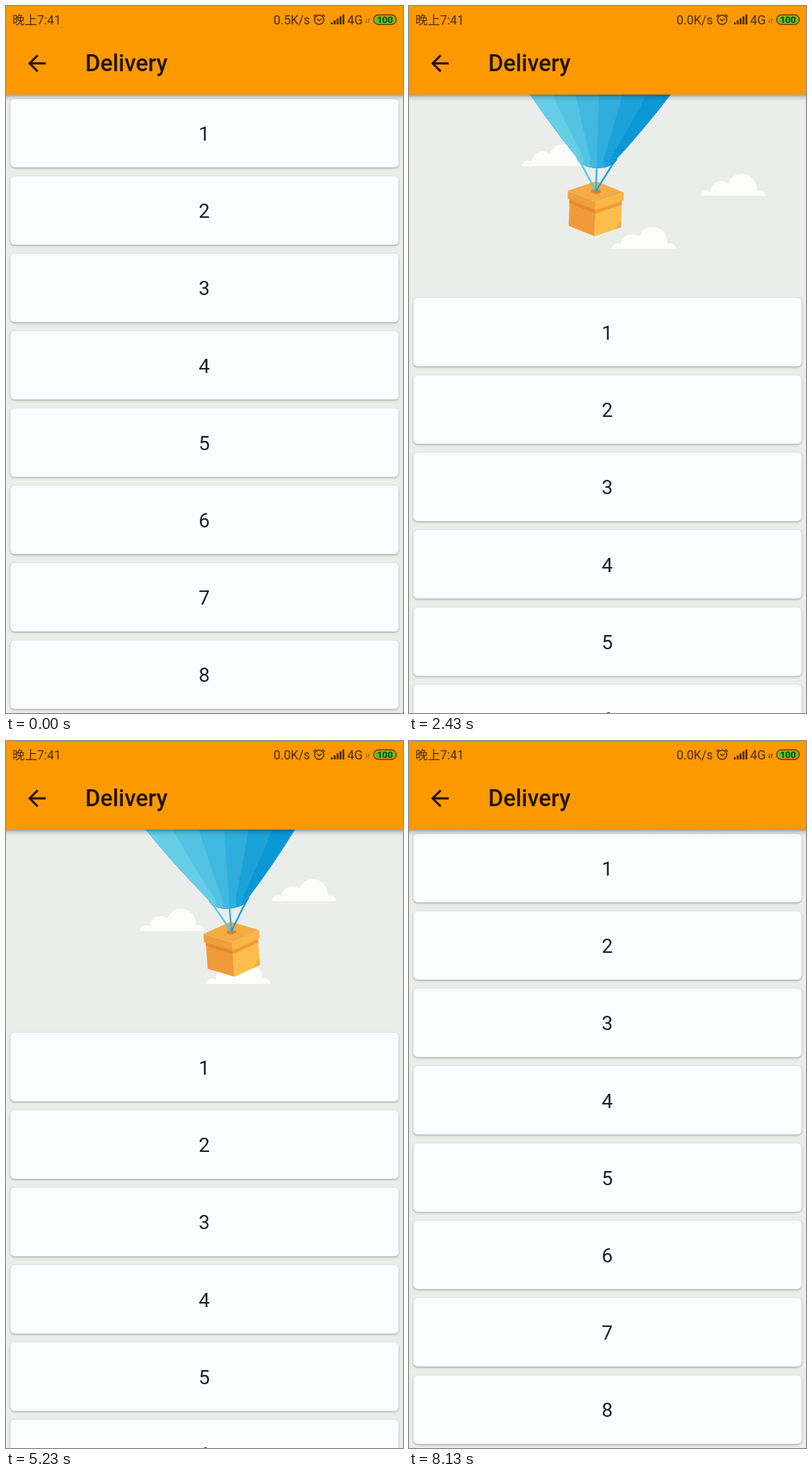
Recreate the animation shown at these times as an HTML page with a canvas. Size 561x998 px, loop 8160 ms.

```html
<!DOCTYPE html>
<html lang="en">
<head>
<meta charset="utf-8">
<title>Delivery</title>
<style>
html, body { margin: 0; width: 100%; height: 100%; overflow: hidden; background: #ebedeb; }
canvas { display: block; width: 561px; height: 998px; }
</style>
</head>
<body>
<canvas id="stage" width="561" height="998"></canvas>
<script>
const W = 561, H = 998, LOOP = 8160;
const BAR = 125, REST = 281, PEAK = 321;
const REFRESH = 1610, CLOUD_W = 93, CLOUD_H = 31;
const ORANGE = '#fd9900', INK = '#211400', STATUS = 'rgba(0,0,0,0.7)';
const ctx = document.getElementById('stage').getContext('2d');

const clamp01 = x => Math.max(0, Math.min(1, x));
const ease = (t, from, to) => (1 - Math.cos(Math.PI * clamp01((t - from) / (to - from)))) / 2;

function poly(color, ...pts) {
  ctx.fillStyle = color;
  ctx.beginPath();
  for (const [x, y] of pts) ctx.lineTo(x, y);
  ctx.fill();
}

function line(color, width, ...pts) {
  ctx.strokeStyle = color;
  ctx.lineWidth = width;
  ctx.beginPath();
  for (const [x, y] of pts) ctx.lineTo(x, y);
  ctx.stroke();
}

function disc(x, y, r) {
  ctx.beginPath();
  ctx.arc(x, y, r, 0, 2 * Math.PI);
  ctx.fill();
}

function pill(color, x, y, w, h, r) {
  ctx.fillStyle = color;
  ctx.beginPath();
  ctx.roundRect(x, y, w, h, r);
  ctx.fill();
}

function text(str, x, y, font, color, align = 'left') {
  ctx.font = font;
  ctx.fillStyle = color;
  ctx.textAlign = align;
  ctx.fillText(str, x, y);
}

function clipRect(x, y, w, h) {
  ctx.beginPath();
  ctx.rect(x, y, w, h);
  ctx.clip();
}

// Pull down, settle at the refreshing height, then close.
function pullExtent(t) {
  return PEAK * ease(t, 530, 1400)
    - (PEAK - REST) * ease(t, 1460, 1740)
    - REST * ease(t, 5640, 6330);
}

// Time since the refresh began; the first stretch runs slightly slow.
function refreshTime(t) {
  return t < 4030 ? (t - REFRESH) * 0.975 : 2360 + t - 4030;
}

function drawCloud(x, bottom) {
  ctx.save();
  ctx.translate(x, bottom - CLOUD_H);
  clipRect(0, 0, CLOUD_W, CLOUD_H);
  ctx.fillStyle = '#fcfdfb';
  for (const [cx, height] of [[9, 8], [30, 21], [59, 31], [84, 8]]) {
    const r = 4 + height * 0.55;
    disc(cx, CLOUD_H - height + r, r);
  }
  ctx.fillRect(16, 26, 64, 5);
  ctx.restore();
}

// One upright isometric face, from the front edge out to one side.
const SLOPE = 0.37;
function wall(color, side, width, top, bottom) {
  const x = side * width, rise = SLOPE * width;
  poly(color, [0, top], [x, top - rise], [x, bottom - rise], [0, bottom]);
}

function drawBox() {
  const body = 37, lid = 39.5, lidTop = -9.5, rise = SLOPE * lid;
  wall('#f19a3a', -1, body, 0, 39);
  wall('#fcbe4b', 1, body, 0, 39);
  poly('#f3ab40', [body, 25], [body, 15], [body - 9, 28.5]);
  wall('#e78730', -1, body, 0, 7);
  wall('#ee9c37', 1, body, 0, 7);
  wall('#ef9f3c', -1, lid, lidTop, 2);
  wall('#fab647', 1, lid, lidTop, 2);
  poly('#f4ac45', [0, lidTop], [lid, lidTop - rise], [0, lidTop - 2 * rise], [-lid, lidTop - rise]);
  ctx.fillStyle = '#e07f2c';
  ctx.beginPath();
  ctx.ellipse(0, lidTop - rise, 7, 3.2, 0, 0, 2 * Math.PI);
  ctx.fill();
}

// Balloon shade from the lit left (-1) to the dark right (1).
function blue(side) {
  const k = (side + 1) / 2;
  return `rgb(${102 - 92 * k},${206 - 55 * k},${230 - 16 * k})`;
}

function drawBalloon() {
  const gores = 6, rim = 29, rimY = -72;
  for (const side of [-1, 0, 1])
    line(blue(side * 0.7), 2.4, [side * 24, -60 - 6 * Math.abs(side)], [0, -25]);
  ctx.save();
  ctx.beginPath();
  ctx.rect(-180, rimY - 220, 360, 220);
  ctx.moveTo(-rim, rimY);
  ctx.bezierCurveTo(-rim + 4, -52.5, rim - 4, -52.5, rim, rimY);
  ctx.clip();
  // Right to left, each gore painted over the rest of the envelope.
  for (let i = gores; i > 0; i--) {
    const edge = 2 * i / gores - 1;
    ctx.fillStyle = blue(2 * (i - 1) / (gores - 1) - 1);
    ctx.beginPath();
    ctx.moveTo(-169, rimY - 200);
    ctx.quadraticCurveTo(-115, rimY - 100, -rim, rimY);
    ctx.lineTo(-rim, -50);
    ctx.lineTo(rim * edge, -50);
    ctx.lineTo(rim * edge, rimY);
    ctx.quadraticCurveTo(115 * edge, rimY - 100, 169 * edge, rimY - 200);
    ctx.fill();
  }
  ctx.restore();
}

function drawParcel(u, extent) {
  const flying = u > 0, slide = u * 0.45;
  const lift = flying ? 86 + Math.min(31, slide) : 86;
  ctx.save();
  ctx.translate(280.5, BAR + extent - lift);
  if (flying) {
    const swing = Math.sin((0.178 * u + 12.9) * Math.PI / 180);
    ctx.translate(87, -560);
    ctx.rotate(0.0735 * swing * clamp01(u / 150));
    ctx.translate(-87, 560);
  }
  drawBox();
  if (flying) {
    ctx.translate(0, Math.min(0, slide - 150));
    drawBalloon();
  }
  ctx.restore();
}

function drawHeader(t, extent) {
  if (extent <= 0) return;
  const u = refreshTime(t);
  ctx.save();
  clipRect(0, BAR, W, extent);
  if (u > 0) {
    for (const [pace, bottom] of [[2, 226], [4, 268], [3, 343]])
      drawCloud((0.1575 * pace * u) % (W + CLOUD_W) - CLOUD_W, bottom);
  }
  drawParcel(u, extent);
  ctx.restore();
}

function drawList(extent) {
  for (let i = 0; i < 8; i++) {
    const y = 131.05 + extent + i * 109.2;
    ctx.save();
    ctx.shadowColor = 'rgba(0,0,0,0.32)';
    ctx.shadowBlur = 3;
    ctx.shadowOffsetY = 1.2;
    pill('#fbfcfd', 6.2, y, 548.6, 96.8, 6);
    ctx.restore();
    text(i + 1, 280, Math.round(y + 59), '28px Roboto, sans-serif', '#1f1f1f', 'center');
  }
}

function drawAlarm(x, y) {
  ctx.strokeStyle = STATUS;
  ctx.lineWidth = 1.5;
  ctx.beginPath();
  ctx.arc(x, y, 6.5, 0, 2 * Math.PI);
  ctx.stroke();
  line(STATUS, 1.4, [x - 3, y - 1.5], [x, y + 1.5], [x + 3.5, y - 1.5]);
  for (const side of [-1, 1])
    line(STATUS, 1.6, [x + side * 8, y - 4.5], [x + side * 4.5, y - 7.7]);
}

function drawStatus(t) {
  const font = '17.5px Roboto, "Noto Sans CJK SC", "Noto Sans CJK", sans-serif';
  text('晚上7:41', 9, 26, font, STATUS);
  text(t < 1750 ? '0.5K/s' : '0.0K/s', 378, 26, font, STATUS);
  drawAlarm(442.5, 19.5);

  ctx.fillStyle = STATUS;
  for (let i = 0; i < 5; i++) {
    const h = 3 + i * 2.8;
    ctx.fillRect(459 + i * 4.1, 26 - h, 2.7, h);
  }
  text('4G', 482, 25.5, '18px Roboto, sans-serif', STATUS);

  const mark = t > 7700 ? 'rgba(0,0,0,0.75)' : 'rgba(0,0,0,0.35)';
  for (const dir of [-1, 1])
    line(mark, 1, [511 + dir * 1.5, 21 + dir * 3], [511 + dir * 1.5, 21 - dir * 3], [511 + dir * 3, 21 - dir]);

  pill('#4b3c08', 518.8, 11.8, 33.4, 15, 7.5);
  pill(ORANGE, 520.3, 13.3, 30.4, 12, 6);
  pill('#48c821', 521.5, 14.5, 28, 9.6, 4.8);
  text('100', 535.5, 23.8, '500 13px Roboto, sans-serif', '#162706', 'center');
}

function drawBar(t) {
  const shadow = ctx.createLinearGradient(0, BAR, 0, BAR + 9);
  shadow.addColorStop(0, 'rgba(0,0,0,0.34)');
  shadow.addColorStop(0.4, 'rgba(0,0,0,0.12)');
  shadow.addColorStop(1, 'rgba(0,0,0,0)');
  ctx.fillStyle = shadow;
  ctx.fillRect(0, BAR, W, 9);
  ctx.fillStyle = ORANGE;
  ctx.fillRect(0, 0, W, BAR);

  const tip = 33.4, midY = 81, reach = 11.4;
  line(INK, 3.1, [tip + reach, midY - reach], [tip, midY], [tip + reach, midY + reach]);
  line(INK, 3.1, [tip + 1, midY], [56.2, midY]);
  text('Delivery', 112, 92, '500 32.6px Roboto, sans-serif', INK);
  drawStatus(t);
}

function draw(t) {
  const extent = pullExtent(t);
  ctx.fillStyle = '#ebedeb';
  ctx.fillRect(0, 0, W, H);
  drawHeader(t, extent);
  drawList(extent);
  drawBar(t);
}

const start = performance.now();
function tick() {
  draw((performance.now() - start) % LOOP);
  requestAnimationFrame(tick);
}
tick();
</script>
</body>
</html>
```
